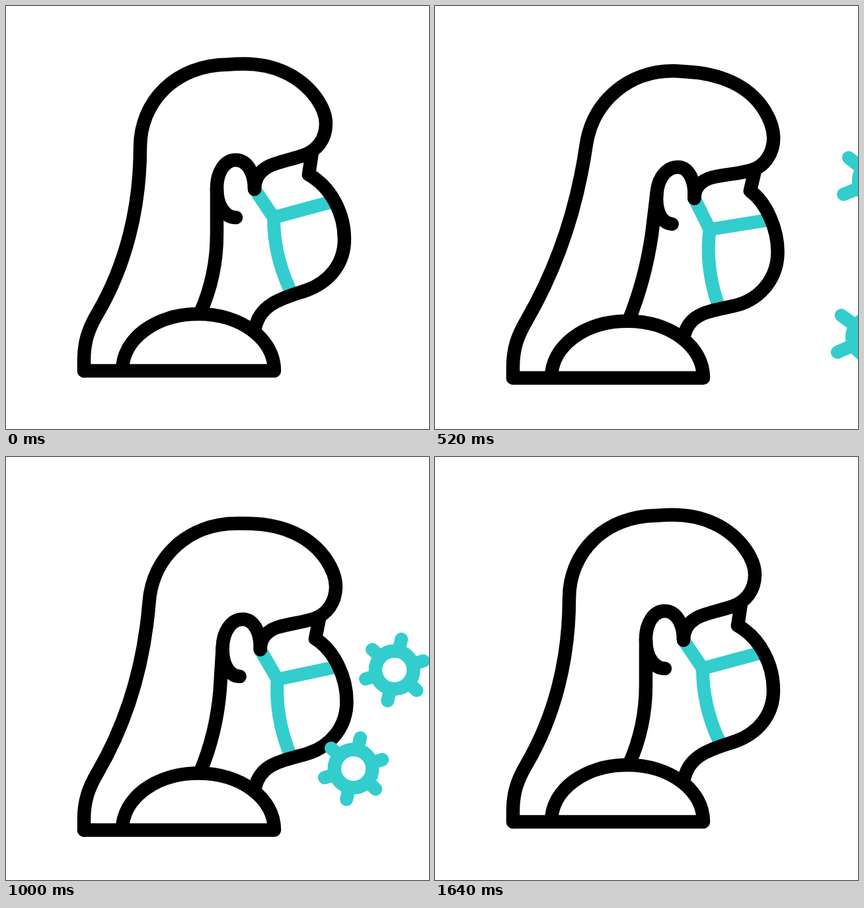
An HTML page that plays this animation: 640 px wide and 640 px high, repeating every 1.84 s.

```html
<!DOCTYPE html>
<html lang="en">
<head>
<meta charset="utf-8">
<title>Mask</title>
<style>
  html, body { margin: 0; width: 100%; height: 100%; overflow: hidden; background: #fff; }
  svg { display: block; width: 100vw; height: 100vh; }
  path, circle { fill: none; }
  #body { stroke: #000; stroke-width: 20.5; stroke-linecap: round; stroke-linejoin: round; }
  #body .mask { stroke: #33cdcd; stroke-width: 20; stroke-linecap: butt; stroke-linejoin: miter; }
  .virus { stroke: #33cdcd; stroke-linecap: round; }
  .virus path { stroke-width: 20; }
  .virus circle { stroke-width: 20.5; fill: #fff; }
</style>
</head>
<body>
<svg viewBox="0 0 640 640">
  <g id="body"></g>
  <g id="viruses"></g>
</svg>
<script>
const LOOP = 1840, STEP = 40, FIRST = 120, LAST = 1640;

// Each outline as [class, upright, leaning]
const outlines = [
  ['mask',
   'M376 277 L405 320 L490 297 M405 320 C405 360 414 396 430 430',
   'M397 283 L418 329 L505 317 M418 329 C412 366 415 402 427 441'],
  ['hair',
   'M118 552 L118 535 C118 508 125 488 138 466 C181 393 203 306 203 214 C203 145 256 89 336 88.5 C342 88 350 87.5 360 87.5 C405 87.5 445 105 470 140 C479 153 484 166 484 178 C484 202 470 219 450 226 C433 232 418 234 401 241 C385 248 376 260 376 277',
   'M118 552 L118 535 C118 508 125 488 138 466 C182 390 216 302 234 199 C246 129 303 87 366 87.5 C373 87.5 379 88.5 386 89 C436 92 480 110 503 146 C514 163 518.5 178 518.5 192 C518 214 506 234 486 240 C467 246 444 246 423 250.5 C405 255 396 266 396 281'],
  ['ear',
   'M376 277 C376 251 364 233 347.5 233 C331 233 319 251 319 276 C319 302 331 320 348 320',
   'M396 281 C398 254 388 233 372 233 C355 233 341 249 339 274 C337 300 345 317 361 319'],
  ['neck',
   'M319 276 L319 345 C319 390 310 428 294 464',
   'M339 274 L330 333 C321 384 309 425 293 465'],
  ['face',
   'M463 222 L458 255 C492 274 512 314 512 353 C512 391 488 418 455 430 C424 441 385 448 377 487',
   'M489 241 L481 272 C504 290 520 330 520 363 C520 402 495 434 459 444 C424 453 386 450 377 488'],
  ['shoulder',
   'M118 552 L406 552 M176 552 C176 504 226 466 291 466 C356 466 406 504 406 552']
];

// Rows: time, x, y, arm reach, turn in degrees
const routes = [
  [[320, 765, 224, 57, -8], [520, 670, 264, 57, -5], [840, 572, 306, 47.5, 0],
   [1120, 613, 335, 46.5, -1], [1320, 725, 365, 51, -6]],
  [[320, 790, 535, 59, -9], [520, 660, 501, 57, -7], [840, 521, 465, 49, 0],
   [1120, 534, 483, 46, -1], [1320, 609, 576, 51, -6], [1480, 725, 700, 55, -10]]
];

const clamp = u => Math.min(1, Math.max(0, u));
const ease = (t, a, b) => { const u = clamp((t - a) / (b - a)); return u * u * (3 - 2 * u); };
const pulse = (t, a, b, c, d) => ease(t, a, b) - ease(t, c, d);

function add(parent, tag, attrs = {}) {
  const el = document.createElementNS('http://www.w3.org/2000/svg', tag);
  for (const k in attrs) el.setAttribute(k, attrs[k]);
  return parent.appendChild(el);
}

function blend(a, b, k) {
  const to = b.match(/[\d.]+/g);
  let i = 0;
  return a.replace(/[\d.]+/g, n => (+n + (to[i++] - n) * k).toFixed(2));
}

// Monotone cubic through one column of a route
function along(rows, col, t) {
  const end = rows.length - 1;
  if (t <= rows[0][0]) return rows[0][col];
  if (t >= rows[end][0]) return rows[end][col];
  const slope = i => (rows[i + 1][col] - rows[i][col]) / (rows[i + 1][0] - rows[i][0]);
  const tangent = i => {
    if (i === 0) return slope(0);
    if (i === end) return slope(end - 1);
    const p = slope(i - 1), q = slope(i);
    return p * q <= 0 ? 0 : 2 * p * q / (p + q);
  };
  const i = rows.findIndex(r => r[0] > t) - 1;
  const h = rows[i + 1][0] - rows[i][0], u = (t - rows[i][0]) / h, v = 1 - u;
  return v * v * (1 + 2 * u) * rows[i][col] + u * u * (3 - 2 * u) * rows[i + 1][col]
    + h * u * v * (v * tangent(i) - u * tangent(i + 1));
}

function arms(reach) {
  let d = '';
  for (let i = 0; i < 6; i++) {
    const a = (i * 60 - 77) * Math.PI / 180;
    const at = r => (r * Math.cos(a)).toFixed(2) + ' ' + (r * Math.sin(a)).toFixed(2);
    d += 'M' + at(32) + 'L' + at(reach + (i % 3 ? -1 : 1));
  }
  return d;
}

const body = document.getElementById('body');
const parts = outlines.map(([name, a, b]) => ({ a, b, el: add(body, 'path', { class: name, d: a }) }));
const viruses = routes.map(rows => {
  const g = add(document.getElementById('viruses'), 'g', { class: 'virus' });
  const path = add(g, 'path');
  add(g, 'circle', { r: 28.8 });
  return { rows, g, path };
});

function draw(t) {
  const lean = pulse(t, 265, 615, 810, 1160);
  const drop = 14 * pulse(t, 130, 700, 885, 1455);
  body.setAttribute('transform', `translate(0 ${drop.toFixed(2)})`);
  for (const p of parts) if (p.b) p.el.setAttribute('d', blend(p.a, p.b, lean));
  for (const { rows, g, path } of viruses) {
    const [x, y, reach, turn] = [1, 2, 3, 4].map(c => along(rows, c, t));
    g.setAttribute('transform', `translate(${x} ${y}) rotate(${turn})`);
    path.setAttribute('d', arms(reach));
  }
}

const start = performance.now();
function tick() {
  const t = (performance.now() - start) % LOOP;
  draw(t < FIRST ? 0 : Math.min(LAST, Math.floor(t / STEP) * STEP));
  requestAnimationFrame(tick);
}
tick();
</script>
</body>
</html>
```
